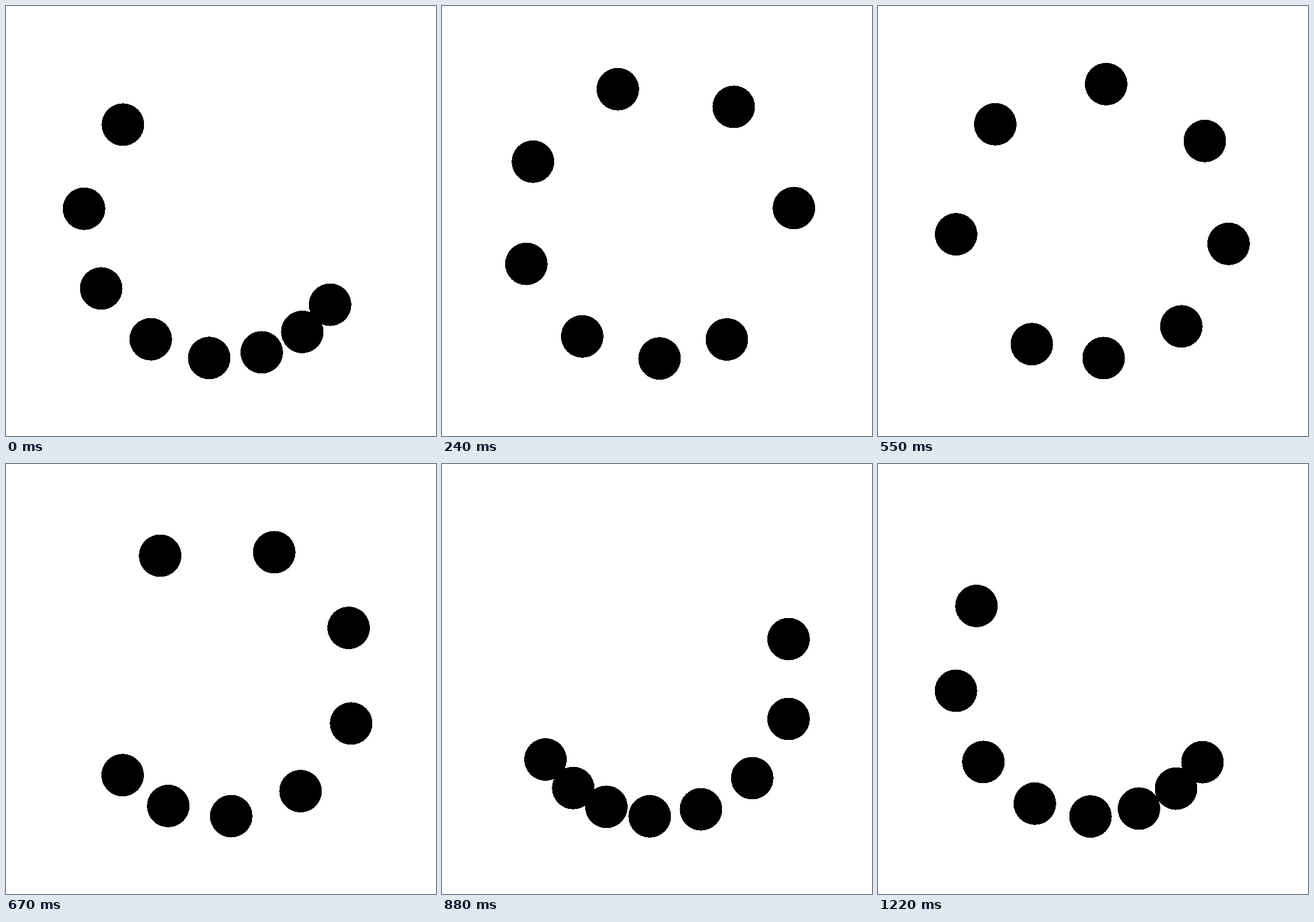
These frames come from a looping animation (748x748 px, 1.25 s). An HTML page:

```html
<!DOCTYPE html>
<html lang="en">
<head>
<meta charset="utf-8">
<title>Rolling dots</title>
<style>
  html, body { margin: 0; height: 100%; overflow: hidden; background: #fff; }
  svg { display: block; width: 100%; height: 100%; }
</style>
</head>
<body>
<svg viewBox="0 0 748 748" shape-rendering="crispEdges"></svg>
<script>
const LOOP = 1250, STEPS = 41, DOTS = 8;
const TICKS = 1200; // clock resolution of one turn
const CENTER = 374, ORBIT = 239.2, RADIUS = 37;

const svg = document.querySelector('svg');
const dots = Array.from({ length: DOTS }, () => {
  const dot = document.createElementNS('http://www.w3.org/2000/svg', 'circle');
  dot.setAttribute('r', RADIUS);
  return svg.appendChild(dot);
});

// cubic-bezier(.5, 0, .5, 1)
function ease(x) {
  let lo = 0, hi = 1;
  for (let n = 0; n < 30; n++) {
    const s = (lo + hi) / 2;
    if (1.5 * s - 1.5 * s * s + s ** 3 < x) lo = s; else hi = s;
  }
  return lo * lo * (3 - 2 * lo);
}

// Steps fall on the nearest 10 ms, hence the half-unit offset.
function phaseAt(ms) {
  const step = Math.floor((ms % LOOP + 5.01) / (LOOP / STEPS)) % STEPS;
  return Math.round(step * TICKS / STEPS) / TICKS;
}

function draw(ms) {
  const phase = phaseAt(ms);
  dots.forEach((dot, k) => {
    const turn = ease((phase + 0.05 * k) % 1);
    // clockwise from the bottom
    const a = (15 * k - 52.5 + 360 * turn) * Math.PI / 180;
    dot.setAttribute('cx', (CENTER - ORBIT * Math.sin(a)).toFixed(2));
    dot.setAttribute('cy', (CENTER + ORBIT * Math.cos(a)).toFixed(2));
  });
}

function tick(now) {
  draw(now);
  requestAnimationFrame(tick);
}

draw(0);
requestAnimationFrame(tick);
</script>
</body>
</html>
```
